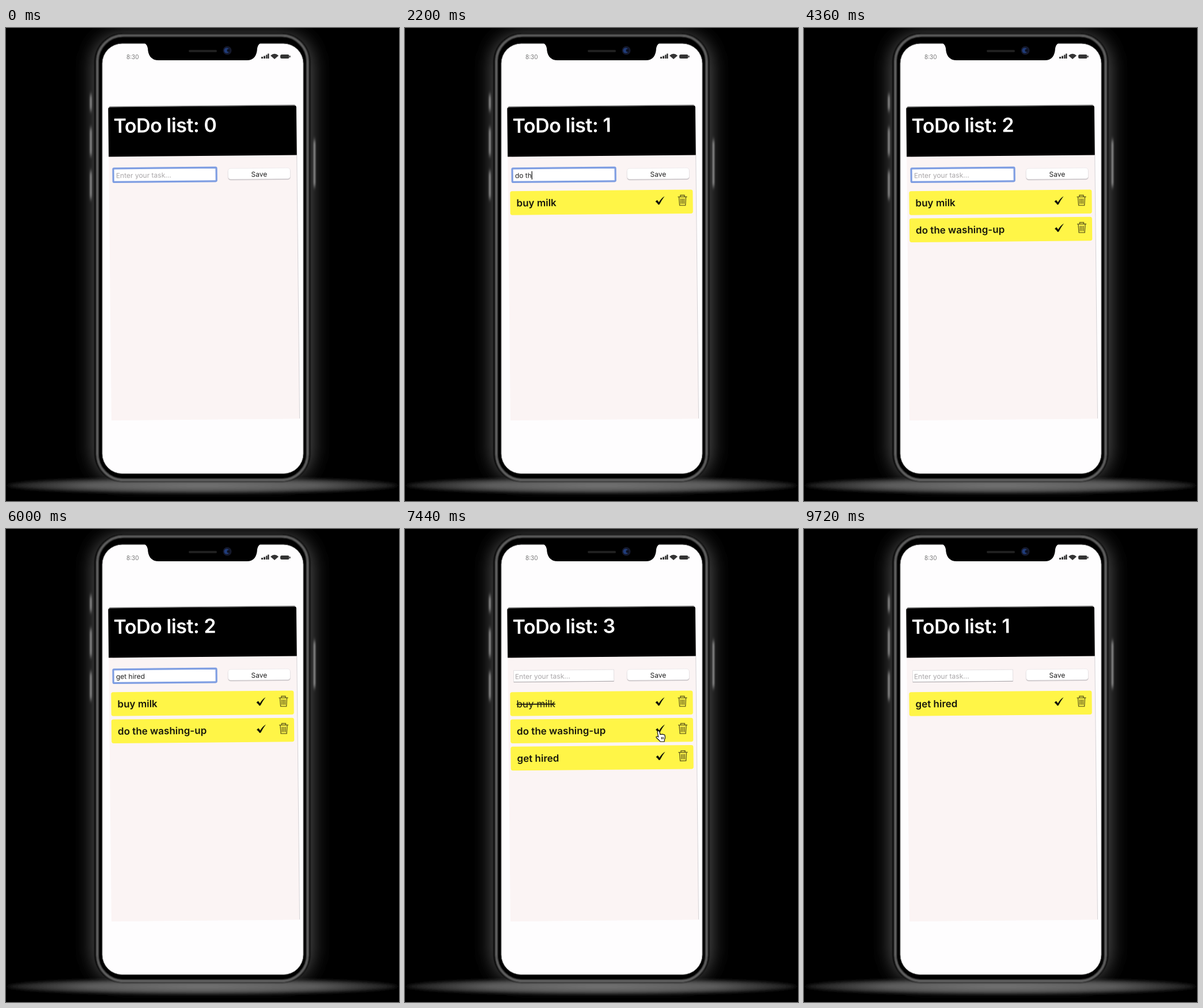
An HTML page for the animation above (9.76 s loop, 682x821 px).

```html
<!DOCTYPE html>
<html lang="en">
<head>
<meta charset="utf-8">
<title>ToDo list</title>
<style>
  html, body { margin: 0; width: 100%; height: 100%; overflow: hidden; background: #000; }
  svg { display: block; width: 100vw; height: 100vh; font-family: Inter, sans-serif; }
  text { white-space: pre; }
  .title { font-size: 34px; font-weight: 600; letter-spacing: -0.5px; fill: #fff; }
  .control { font-size: 12px; fill: #222; }
  .placeholder { fill: #a9a6a8; }
  .task { font-size: 17px; font-weight: 600; fill: #17170c; }
  .done { font-weight: 400; text-decoration: line-through; }
</style>
</head>
<body>
<svg viewBox="0 0 682 821">
  <defs>
    <filter id="glow" x="-30%" y="-20%" width="160%" height="140%"><feGaussianBlur stdDeviation="16"/></filter>
    <filter id="soft" x="-50%" y="-50%" width="200%" height="200%"><feGaussianBlur stdDeviation="0.7"/></filter>
    <filter id="rim" x="-10%" y="-10%" width="120%" height="120%"><feGaussianBlur stdDeviation="1.3"/></filter>
    <filter id="shine" x="-300%" y="-20%" width="700%" height="140%"><feGaussianBlur stdDeviation="1.2 4"/></filter>
    <filter id="floorBlur" x="-10%" y="-60%" width="120%" height="220%"><feGaussianBlur stdDeviation="4 2.5"/></filter>
    <radialGradient id="floor">
      <stop offset="0" stop-color="#747474"/>
      <stop offset=".6" stop-color="#5c5c5c"/>
      <stop offset="1" stop-color="#1c1c1c"/>
    </radialGradient>
    <g id="check">
      <path d="M-8 1.6L-5 -1Q-3 .8 -2 3Q2 -4 8 -7.5Q3 -1 -1 6.7L-3 7.2Q-4.7 4 -8 1.6Z" fill="#14140a"/>
    </g>
    <g id="trash" fill="none" stroke="#66601f" stroke-width="1.4">
      <path d="M-8 -6.5H8M-3.5 -7V-9.3H3.5V-7M-6 -6L-5 8.3H5L6 -6M-2.7 -3.5V5.7M0 -3.5V5.7M2.7 -3.5V5.7"/>
    </g>
  </defs>

  <rect width="682" height="821"/>
  <rect x="151" y="12" width="380" height="772" rx="50" fill="#565656" filter="url(#glow)"/>
  <ellipse cx="341" cy="794" rx="338" ry="14" fill="url(#floor)" filter="url(#floorBlur)"/>

  <g fill="#888" filter="url(#shine)">
    <rect x="145.5" y="116" width="3.5" height="27"/>
    <rect x="145.5" y="174" width="3.5" height="47"/>
    <rect x="145.5" y="249" width="3.5" height="47"/>
    <rect x="533.5" y="195" width="3.5" height="80"/>
  </g>
  <g filter="url(#rim)">
    <rect x="153.500" y="9.500" width="374.500" height="778" rx="49"/>
    <rect x="158.500" y="13" width="365" height="771.500" rx="45" fill="#000" stroke="#6a6a6a" stroke-width="3"/>
  </g>
  <g filter="url(#soft)">
    <rect x="167" y="27" width="349" height="746.500" rx="34.500" fill="#fefdfe" stroke="#777" stroke-width="1"/>
    <path d="M236 24Q245 27 246 35Q247 56 265 56H418Q435 56 436 35Q437 27 446 24Z"/>
    <path d="M319 40H364" stroke="#202020" stroke-width="4" stroke-linecap="round"/>
    <circle cx="384" cy="39" r="7.500" fill="#15192c"/>
    <circle cx="383" cy="39" r="4.500" fill="#203c7a"/>
    <circle cx="386" cy="39" r="2.500" fill="#0b1020"/>
    <text x="209" y="53.500" font-size="10" fill="#777">8:30</text>
    <g fill="#333">
      <path d="M443 50H446V53H443ZM447 48.500H450V53H447ZM451 46.500H453.500V53H451ZM454 44.500H456.500V53H454Z"/>
      <path d="M459 48Q466 41.500 473 48L466 54Z"/>
      <rect x="476" y="46" width="15.500" height="7" rx="2.500"/>
      <rect x="492" y="48" width="1.500" height="3"/>
    </g>
  </g>

  <g transform="matrix(1 -.0092 .0105 1 177.300 137.700)">
    <rect width="326.500" height="543.500" fill="#fbf4f4"/>
    <path d="M326.500 86V543" stroke="#cbc8cc" stroke-width=".8"/>
    <path d="M0 85.800V3Q0 -.5 4 -.5H322.500Q326.500 -.5 326.500 3V85.800Z"/>
    <path d="M2 -1H324" stroke="#888" stroke-width="1.500"/>
    <text id="title" class="title" x="9" y="44.300"></text>

    <g id="idleField">
      <rect x="10" y="108" width="174" height="20" fill="#fff" stroke="#dedadd" stroke-width=".8"/>
      <path d="M10 128.200H184" stroke="#aaa6aa"/>
    </g>
    <rect id="focusField" x="7.600" y="106.200" width="179" height="23.600" rx="1.500" fill="#fff" stroke="#7f9ee2" stroke-width="3.200"/>
    <text id="entry" class="control" x="12.300" y="122.800"></text>
    <path id="caret" d="M0 111.200V125.600" stroke="#111" stroke-width="1.200"/>

    <rect x="206.800" y="109.200" width="108" height="19" rx="4.500" fill="#bdb9bc" filter="url(#soft)"/>
    <rect x="206.800" y="108" width="108" height="18.800" rx="4.500" fill="#fff" stroke="#e4e0e3" stroke-width=".6"/>
    <text class="control" x="260.800" y="122.800" text-anchor="middle">Save</text>
    <g id="rows"></g>
  </g>

  <g id="cursor">
    <path id="hand" fill="#fff" stroke="#111" stroke-width="1.200" stroke-linejoin="round"
      d="M-2 1.500Q-2 -.5 0 -.5Q1.500 -.5 1.800 1.300L2.800 6Q4 4.500 5.500 5.800Q7 4.600 8.400 6Q10.500 5.200 11 7.500Q12 12 10.500 14L10 18H3Q1 15.500 -3.500 11.500Q-5 9.500 -3 9Q-1.500 9 -.3 10.200ZM5.500 10V14M8 10V14"/>
    <path id="arrow" stroke="#fff" d="M0 0V14L3.300 11L5.400 16L7.800 15L5.700 10.200H10Z"/>
  </g>
</svg>
<script>
const LOOP = 9760;
const BLUR_TIME = 7040;

// Each task is typed, saved, ticked and finally removed (times in ms).
const tasks = [
  { text: 'buy milk', start: 100, step: 110, saved: 1160, done: 7040, removed: 8240 },
  { text: 'do the washing-up', start: 1620, step: 113, saved: 3800, done: 7560, removed: 8720 },
  { text: 'get hired', start: 4300, step: 120, saved: 6240, done: Infinity, removed: Infinity }
];

// Pointer stops: arrival time, departure time, x, y.
const stops = [
  [6560, 6640, 430, 400],
  [6920, 7120, 441, 302],
  [7360, 7680, 440, 351],
  [8040, 9200, 481, 301]
];

const $ = id => document.getElementById(id);
const show = (id, on) => $(id).setAttribute('visibility', on ? 'visible' : 'hidden');
const ease = u => u * u * (3 - 2 * u);

function pointerAt(t) {
  if (t < stops[0][0] || t >= stops.at(-1)[1]) return null;
  const i = stops.findLastIndex(s => t >= s[0]);
  const [, leave, x, y] = stops[i];
  if (t <= leave) return { x, y, hand: i > 0 };
  const [arrive, , nextX, nextY] = stops[i + 1];
  const u = ease((t - leave) / (arrive - leave));
  return {
    x: x + (nextX - x) * u,
    y: y + (nextY - y) * u,
    hand: u > 0.85 || (i > 0 && u < 0.15)
  };
}

function drawEntry(t) {
  const focused = t < BLUR_TIME;
  const active = tasks.find(k => t < k.saved);
  const count = active
    ? Math.max(0, Math.min(active.text.length, Math.floor((t - active.start) / active.step)))
    : 0;
  const typed = active ? active.text.slice(0, count) : '';
  const entry = $('entry');
  entry.textContent = typed || 'Enter your task...';
  entry.classList.toggle('placeholder', !typed);

  const lastSave = Math.max(-600, ...tasks.map(k => k.saved).filter(s => s <= t));
  const lastEdit = typed ? active.start + count * active.step : lastSave;
  const caretOn = Math.floor((t - lastEdit) / 500) % 2 === 0;
  const caretX = 12.8 + (typed ? entry.getComputedTextLength() : 0);
  $('caret').setAttribute('transform', `translate(${caretX} 0)`);
  show('caret', focused && caretOn);
  show('focusField', focused);
  show('idleField', !focused);
}

function drawRows(t) {
  const list = tasks.filter(k => t >= k.saved && t < k.removed);
  $('title').textContent = `ToDo list: ${list.length}`;
  const markup = list.map((k, i) => `
    <g transform="translate(3.5 ${145.6 + 47.3 * i})">
      <rect width="317" height="41.5" rx="3.5" fill="#fff547"/>
      <text class="task${t >= k.done ? ' done' : ''}" x="11" y="26.6">${k.text}</text>
      <use href="#check" x="260" y="18.6"/>
      <use href="#trash" x="299" y="19"/>
    </g>`).join('');
  if (markup !== drawRows.last) $('rows').innerHTML = drawRows.last = markup;
}

function drawPointer(t) {
  const p = pointerAt(t);
  show('hand', p && p.hand);
  show('arrow', p && !p.hand);
  if (p) $('cursor').setAttribute('transform', `translate(${p.x} ${p.y})`);
}

function draw(now) {
  const t = now % LOOP;
  drawEntry(t);
  drawRows(t);
  drawPointer(t);
}

const begin = performance.now();
function frame() {
  draw(performance.now() - begin);
  requestAnimationFrame(frame);
}
frame();
</script>
</body>
</html>
```
